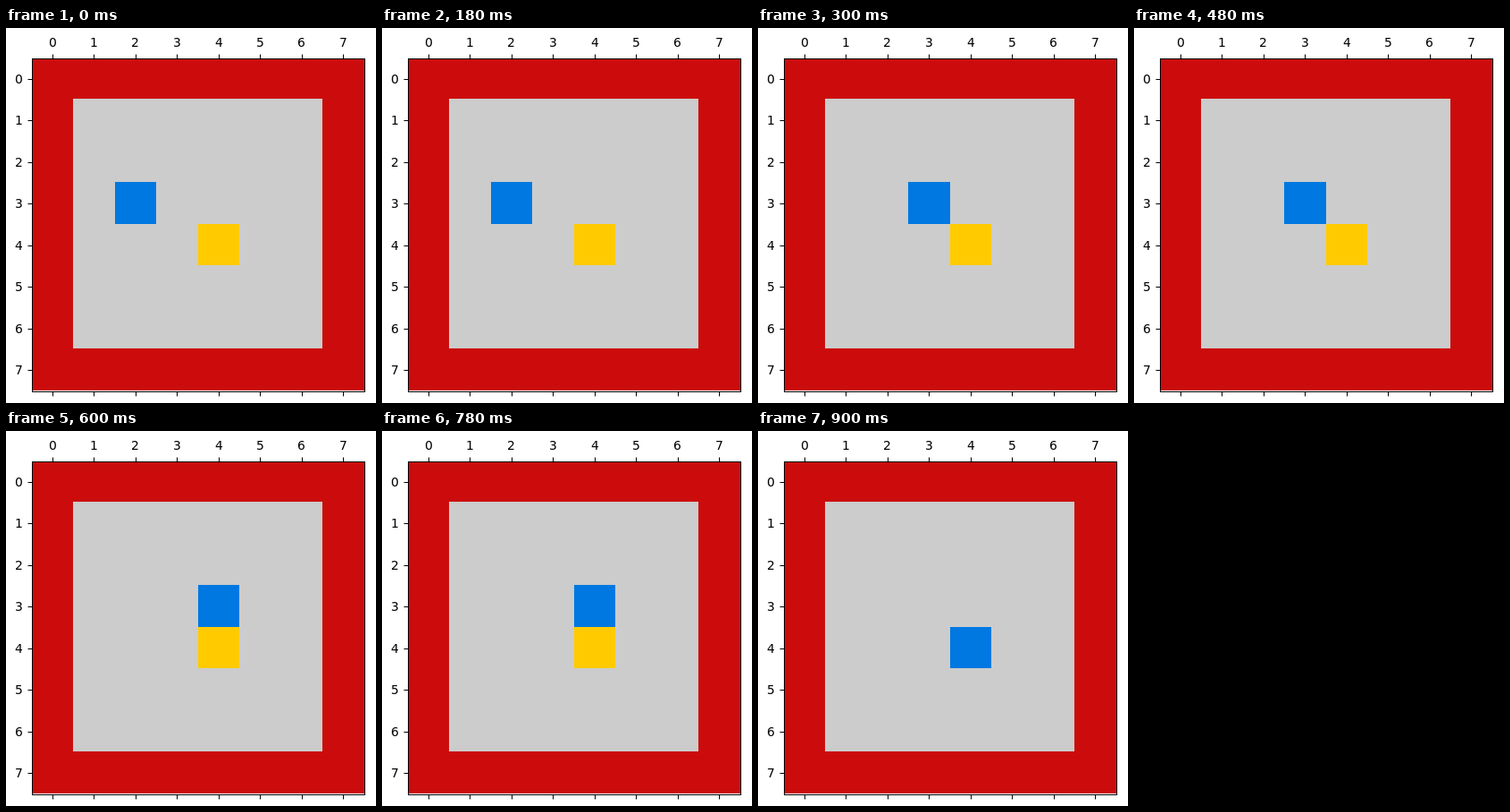
An HTML page for the animation above (1200 ms loop, 414 by 419 pixels).

```html
<!DOCTYPE html>
<html lang="en">
<head>
<meta charset="utf-8">
<title>Grid walk</title>
<style>
  html, body { margin: 0; width: 100%; height: 100%; overflow: hidden; background: #fff; }
  svg { display: block; }
  .board rect { shape-rendering: crispEdges; }
  text { font: 13.89px "DejaVu Sans", sans-serif; fill: #000; }
  .wall { fill: #cc0c0c; }
  .floor { fill: #ccc; }
  .goal { fill: #ffcb00; }
  .agent { fill: #0078e1; animation: walk 1200ms step-end infinite; }
  .frame { fill: none; stroke: #000; }
  /* one cell is 46.5px: right, right, down */
  @keyframes walk {
    0%   { x: 121.75px; y: 172.25px; }
    25%  { x: 168.25px; y: 172.25px; }
    50%  { x: 214.75px; y: 172.25px; }
    75%, 100% { x: 214.75px; y: 218.75px; }
  }
</style>
</head>
<body>
<svg width="414" height="419" viewBox="0 0 414 419">
  <g class="board">
    <rect class="wall" x="29" y="34" width="372" height="371"/>
    <rect class="floor" x="75" y="79" width="279" height="279"/>
    <rect class="goal" x="214.75" y="218.75" width="46.5" height="46.5"/>
    <rect class="agent" x="121.75" y="172.25" width="46.5" height="46.5"/>
    <rect class="frame" x="29.5" y="34.5" width="372" height="372"/>
  </g>
  <g id="axes"></g>
</svg>
<script>
  const axes = document.getElementById('axes');
  const CELL = 46.5;
  const TICK = 5;

  // halves go to the even neighbour, as plot labels are placed
  const roundEven = v => v % 1 === 0.5 ? 2 * Math.round(v / 2) : Math.round(v);

  function add(tag, attrs, text = '') {
    const el = document.createElementNS('http://www.w3.org/2000/svg', tag);
    for (const key in attrs) el.setAttribute(key, attrs[key]);
    el.textContent = text;
    axes.append(el);
  }

  for (let i = 0; i < 8; i++) {
    const x = Math.floor(52 + CELL * i);
    const y = Math.round(56.5 + CELL * i);
    add('rect', { x, y: 29.5, width: 1, height: TICK });
    add('rect', { x, y: 406.5, width: 1, height: TICK });
    add('rect', { x: 24.5, y, width: TICK, height: 1 });
    add('text', { x: roundEven(47.5 + CELL * i), y: 21 }, i);
    add('text', { x: 10, y: y + 5 }, i);
  }
</script>
</body>
</html>
```
